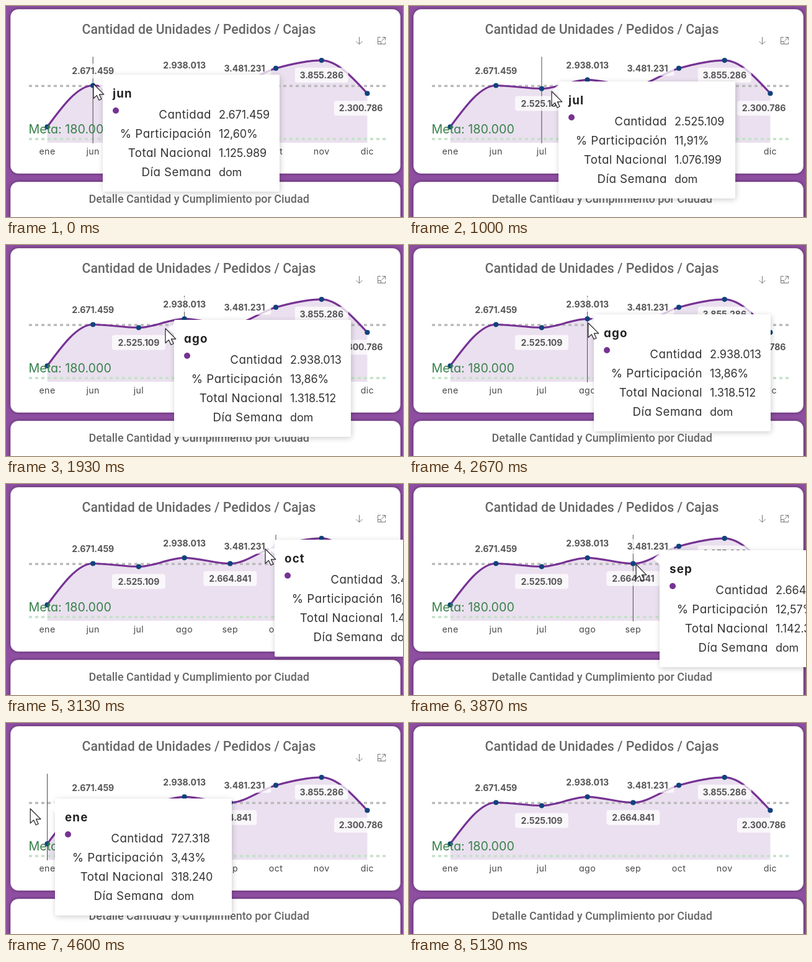
These frames come from a looping animation (640 px wide and 341 px high, 6540 ms). An HTML page:

```html
<!DOCTYPE html>
<html lang="es">
<head>
<meta charset="utf-8">
<title>Cantidad de Unidades</title>
<style>
  html, body { margin: 0; width: 100%; height: 100%; overflow: hidden; background: #8e4fa1; }
  svg { position: absolute; left: 0; top: 0; overflow: visible; }
  text { font-family: Inter, "Open Sans", sans-serif; font-feature-settings: "cv11"; }
  .card { fill: #fff; stroke: #ddd6e0; filter: drop-shadow(0 0 2.5px rgba(30, 0, 45, .55)); }
  .head { font-family: Roboto, Arial, sans-serif; font-weight: 500; fill: #666; text-anchor: middle; }
  .axis { font-size: 14.2px; letter-spacing: .4px; fill: #484848; text-anchor: middle; }
  .val { font-size: 14.1px; font-weight: 700; letter-spacing: -.1px; fill: #555; text-anchor: middle; }
  .meta { font-size: 19.7px; fill: #37814a; }
  .dash { fill: none; stroke-width: 3.4; stroke-dasharray: 5 5; }
  #icons { fill: none; stroke: #777; }
  #tip { position: absolute; left: 0; top: 0; width: 285px; height: 189px; background: #fff;
         border-radius: 2px; box-shadow: 1px 2px 10px rgba(0, 0, 0, .2); }
  #name { font-size: 18.7px; font-weight: 700; letter-spacing: 1.2px; fill: #222; }
  .key { font-size: 18.7px; letter-spacing: .45px; fill: #333; text-anchor: end; }
  .num { font-size: 18px; letter-spacing: -.1px; fill: #333; }
</style>
</head>
<body>
<svg width="640" height="341">
  <rect class="card" x="7.5" y="5.5" width="628" height="265" rx="12"/>
  <rect class="card" x="7.5" y="284.5" width="628" height="120" rx="12"/>
  <text class="head" x="311" y="45" font-size="21.25">Cantidad de Unidades / Pedidos / Cajas</text>
  <text class="head" x="311.2" y="318" font-size="18">Detalle Cantidad y Cumplimiento por Ciudad</text>
  <g id="icons">
    <path d="M569.5 50V62M564.5 57L569.5 62L574.5 57"/>
    <path d="M604 50.5H599.5V61.5H611.5V58.5M600 57.5H604.5V61M606.5 50.5H611.5V55.5M611.5 50.5L605.5 56.5"/>
  </g>
  <path id="area" fill="#763293" fill-opacity=".15"/>
  <path class="dash" d="M37 129.3H612" stroke="#bababa"/>
  <path class="dash" d="M37 215H612" stroke="#c4e1c7"/>
  <path id="line" fill="none" stroke="#763293" stroke-width="3.2"/>
  <path id="cross" stroke="#4a4a4a" d="M0 82V222"/>
  <g id="dots" fill="#10437c"></g>
  <g id="labels"></g>
  <text class="meta" x="36.5" y="206">Meta: 180.000</text>
</svg>

<div id="tip">
  <svg width="285" height="189">
    <path d="M0 5L-10 14L0 23Z" fill="#fff" fill-opacity=".85"/>
    <text id="name" x="16" y="37"></text>
    <circle cx="21" cy="58" r="5" fill="#763293"/>
    <g id="rows"></g>
  </svg>
</div>

<svg width="640" height="341">
  <path id="cursor" d="M0 0V23.5L5.4 18.4L9 26.3L13 24.5L9.4 16.9H16.8Z"
        fill="#fff" stroke="#222" stroke-width="1.2" stroke-linejoin="round"/>
</svg>

<script>
const $ = id => document.getElementById(id);
const clamp = (v, lo, hi) => Math.max(lo, Math.min(hi, v));

// Monotone cubic: the slope at every point, with no overshoot between points.
function slopes(xs, ys) {
  const h = i => xs[i + 1] - xs[i];
  const s = i => (ys[i + 1] - ys[i]) / h(i);
  const last = xs.length - 1;
  const m = xs.map((_, i) => {
    if (i === 0 || i === last) return 0;
    const a = s(i - 1), b = s(i);
    const mean = (a * h(i) + b * h(i - 1)) / (h(i - 1) + h(i));
    return (Math.sign(a) + Math.sign(b)) * Math.min(Math.abs(a), Math.abs(b), Math.abs(mean) / 2);
  });
  m[0] = (3 * s(0) - m[1]) / 2;
  m[last] = (3 * s(last - 1) - m[last - 1]) / 2;
  return m;
}

function spline(xs, ys) {
  const m = slopes(xs, ys), last = xs.length - 1;
  return v => {
    const x = clamp(v, xs[0], xs[last]);
    const i = Math.max(0, xs.findIndex(k => k >= x) - 1);
    const h = xs[i + 1] - xs[i], f = (x - xs[i]) / h, g = 1 - f;
    return ys[i] * g * g * (1 + 2 * f) + ys[i + 1] * f * f * (3 - 2 * f)
         + h * f * g * (m[i] * g - m[i + 1] * f);
  };
}

// Chart: month, units, national total, label side
const X0 = 66.5, STEP = 73.7, BASE = 220.3, UNITS_PER_PX = 29100, YEAR = 21.2e6;
const SIDES = { up: [0, -18.4], down: [0, 29], left: [-50.5, 5] };
const months = [
  ['ene', 727318, 318240],
  ['jun', 2671459, 1125989, 'up'],
  ['jul', 2525109, 1076199, 'down'],
  ['ago', 2938013, 1318512, 'up'],
  ['sep', 2664841, 1142306, 'down'],
  ['oct', 3481231, 1451870, 'left'],
  ['nov', 3855286, 1602415, 'down'],
  ['dic', 2300786, 984127, 'down']
].map(([name, units, total, side], i) =>
  ({ name, units, total, side, x: X0 + STEP * i, y: BASE - units / UNITS_PER_PX }));

const dots3 = n => String(n).replace(/\B(?=(\d{3})+$)/g, '.');
const percent = n => (100 * n / YEAR).toFixed(2).replace('.', ',') + '%';

const slope = slopes(months.map(p => p.x), months.map(p => p.y));
const curve = months.map((p, i) => {
  if (!i) return `M${p.x} ${p.y}`;
  const q = months[i - 1], d = STEP / 3;
  return `C${q.x + d} ${q.y + d * slope[i - 1]} ${p.x - d} ${p.y - d * slope[i]} ${p.x} ${p.y}`;
}).join('');

function label({ units, side, x, y }) {
  if (!side) return '';
  const cx = Math.min(x + SIDES[side][0], 572), cy = y + SIDES[side][1];
  return `<rect x="${cx - 43}" y="${cy - 17}" width="86" height="24" rx="4" fill="#fff" fill-opacity=".75"/>
    <text class="val" x="${cx}" y="${cy}">${dots3(units)}</text>`;
}

$('line').setAttribute('d', curve);
$('area').setAttribute('d', `${curve}V221H${X0}Z`);
$('dots').innerHTML = months.map(p => `<circle cx="${p.x}" cy="${p.y}" r="4.1"/>`).join('');
$('labels').innerHTML = months.map(p =>
  `<text class="axis" x="${p.x}" y="240">${p.name}</text>${label(p)}`).join('');
$('rows').innerHTML = ['Cantidad', '% Participación', 'Total Nacional', 'Día Semana'].map((key, i) =>
  `<text class="key" x="175" y="${71 + 31 * i}">${key}</text>
   <text class="num" x="187" y="${71 + 31 * i}"></text>`).join('');
const nums = document.querySelectorAll('.num');

// Pointer stops: tick, x, y
const TICK = 1000 / 15, LOOP = 6540, LEAVE = 70, GONE = 74, FADED = 77;
const stops = [
  [10, 141, 126], [14, 226, 137], [15, 230, 138], [28, 256, 136], [29, 257, 135],
  [33, 283, 127], [39, 283, 127], [40, 289, 126], [43, 360, 137], [46, 418, 105],
  [48, 418, 105], [49, 415, 105], [55, 415, 105], [58, 366, 130], [63, 198, 136],
  [64, 179, 135], [70, 24, 140], [73, 10, 345]
];
const column = n => stops.map(s => s[n]);
const px = spline(column(0), column(1)), py = spline(column(0), column(2));

const show = (el, on) => { el.style.visibility = on ? 'visible' : 'hidden'; };

function draw(k) {
  $('cursor').setAttribute('transform', `translate(${px(k)} ${py(k)})`);
  show($('cursor'), k < GONE);
  show($('icons'), k < GONE);

  // the tooltip trails the pointer by one tick
  const late = Math.min(k - 1, LEAVE), x = px(late), y = py(late);
  const p = months[clamp(Math.round((x - X0) / STEP), 0, months.length - 1)];
  $('tip').style.transform = `translate(${Math.round(x + 15)}px, ${Math.round(y - 15)}px)`;
  $('tip').style.opacity = clamp((FADED - k) * .35, 0, 1);
  $('cross').setAttribute('transform', `translate(${p.x} 0)`);
  show($('cross'), k <= LEAVE + 1);

  $('name').textContent = p.name;
  [dots3(p.units), percent(p.units), dots3(p.total), 'dom'].forEach((v, i) => { nums[i].textContent = v; });
}

const start = performance.now();
function loop() {
  const t = (performance.now() - start) % LOOP;
  draw(Math.floor((t + 4) / TICK));
  requestAnimationFrame(loop);
}
loop();
</script>
</body>
</html>
```
